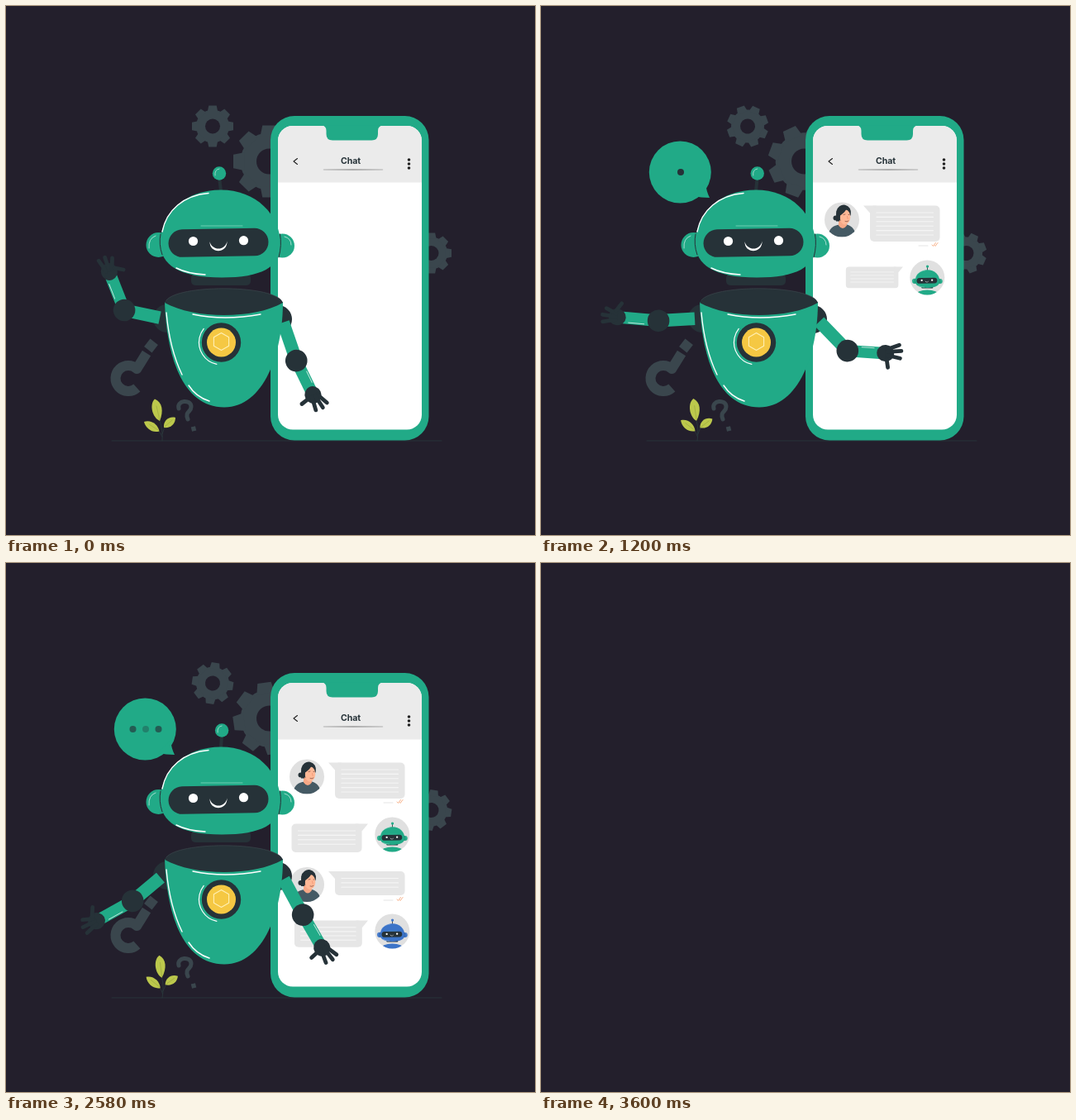
Recreate the animation shown at these times as an HTML page with a canvas. Size 640 by 640 pixels, loop 3.63 s.

```html
<!DOCTYPE html>
<html lang="en">
<head>
<meta charset="utf-8">
<title>Chat robot</title>
<style>
html, body { margin: 0; width: 100%; height: 100%; overflow: hidden; background: #231f2c; }
canvas { display: block; width: 640px; height: 640px; }
</style>
</head>
<body>
<canvas id="stage" width="640" height="640"></canvas>
<script>
const ctx = document.getElementById('stage').getContext('2d');
const LOOP = 3630, BLANK_AT = 3600, TAU = Math.PI * 2;
const BG = '#231f2c', TEAL = '#21aa87', DARK = '#263238', GREY = '#3a464d', LEAF = '#bcc84c';

const clamp = v => Math.max(0, Math.min(1, v));
const smooth = v => { v = clamp(v); return v * v * (3 - 2 * v); };
const mix = (a, b, p) => a + (b - a) * p;
const pop = (t, start, length = 250) => smooth((t - start) / length);
const rad = deg => deg * Math.PI / 180;

// Eased value through [time, value] pairs.
function track(t, keys) {
  for (let i = 1; i < keys.length; i++) {
    const [t0, a] = keys[i - 1], [t1, b] = keys[i];
    if (t <= t1) return mix(a, b, smooth((t - t0) / (t1 - t0)));
  }
  return keys[keys.length - 1][1];
}

function fill(color, path) {
  ctx.beginPath();
  path();
  ctx.fillStyle = color;
  ctx.fill();
}
function stroke(color, width, path, cap = 'round') {
  ctx.beginPath();
  path();
  ctx.strokeStyle = color;
  ctx.lineWidth = width;
  ctx.lineCap = cap;
  ctx.lineJoin = 'round';
  ctx.stroke();
}
const disc = (x, y, r, color) => fill(color, () => ctx.arc(x, y, r, 0, TAU));
const oval = (x, y, rx, ry, color, turn = 0) => fill(color, () => ctx.ellipse(x, y, rx, ry, turn, 0, TAU));
const box = (x, y, w, h, r, color) => fill(color, () => ctx.roundRect(x, y, w, h, r));
const line = (color, width, x0, y0, x1, y1, cap) =>
  stroke(color, width, () => { ctx.moveTo(x0, y0); ctx.lineTo(x1, y1); }, cap);
const curve = (color, width, d) => {
  ctx.strokeStyle = color;
  ctx.lineWidth = width;
  ctx.lineCap = 'round';
  ctx.stroke(new Path2D(d));
};
const shape = (color, d) => { ctx.fillStyle = color; ctx.fill(new Path2D(d)); };

function group(draw) {
  ctx.save();
  draw();
  ctx.restore();
}
function scaled(x, y, s, draw) {
  if (s <= 0) return;
  group(() => {
    ctx.translate(x, y);
    ctx.scale(s, s);
    ctx.translate(-x, -y);
    draw();
  });
}

function gear(x, y, r, hole, turn) {
  group(() => {
    ctx.translate(x, y);
    ctx.rotate(turn);
    fill(GREY, () => {
      ctx.arc(0, 0, r * 0.8, 0, TAU);
    });
    for (let i = 0; i < 8; i++) {
      fill(GREY, () => {
        ctx.moveTo(-r * 0.25, -r * 0.7);
        ctx.lineTo(-r * 0.19, -r);
        ctx.lineTo(r * 0.19, -r);
        ctx.lineTo(r * 0.25, -r * 0.7);
      });
      ctx.rotate(TAU / 8);
    }
    disc(0, 0, hole, BG);
  });
}

function questionMarks() {
  stroke(GREY, 12, () => {
    ctx.arc(148, 450.5, 15.5, rad(48), rad(312));
    ctx.lineTo(170, 420);
  }, 'butt');
  group(() => {
    ctx.translate(175.5, 411);
    ctx.rotate(rad(38));
    ctx.fillStyle = GREY;
    ctx.fillRect(-6, -6, 12, 12);
  });
  curve(GREY, 5, 'M209 487C206 477 224 475 224 485C224 492 216 490 220 500');
  group(() => {
    ctx.translate(227, 511.5);
    ctx.rotate(rad(-15));
    ctx.fillStyle = GREY;
    ctx.fillRect(-2.7, -2.7, 5.4, 5.4);
  });
}

function plant(t) {
  const sway = (1 - Math.cos(TAU * t / (LOOP / 2))) / 2;
  group(() => {
    ctx.translate(189, 526);
    ctx.rotate(rad(6.5 * sway));
    ctx.translate(-189, -526);
    curve('#2b3a3e', 0.8, 'M189 526Q190 512 186 502M189 521Q187 516 184 514M189 518L192 509');
    shape(LEAF, 'M186 502C177 498 173 482 180 475.5C189 479 191 490 186 502Z');
    shape(LEAF, 'M185.500 514.500C177 517 169 511 167 503C175 500 184 506 185.500 514.500Z');
    shape(LEAF, 'M191 510C190 502 197 496 205 498C205 506 199 511 191 510Z');
    curve('#8f9a3c', 0.5, 'M186 501L182 484M184 513L173 506M192 509L201 501');
  });
}

function speechBubble(t) {
  scaled(203, 232, pop(t, 60, 440), () => {
    disc(168.3, 201, 37.5, TEAL);
    shape(TEAL, 'M184 230Q194 232 204 232Q200 224 199 214Z');
    const outer = (1 - Math.cos(TAU * t / 600)) / 2;
    [[153.5, outer], [169, 1 - outer], [184.5, outer]].forEach(([x, alpha]) => {
      ctx.globalAlpha = alpha;
      disc(x, 201, 4, DARK);
    });
  });
}

function phone() {
  box(320, 133, 191.5, 392.5, 29, TEAL);
  box(329, 145, 174, 367.500, 18, '#fff');
  box(329, 145, 174, 68.500, [18, 18, 0, 0], '#ebebeb');
  shape(TEAL, 'M382 144.500Q387.500 145 387.500 151V155Q387.500 162.500 395 162.500H442.500Q450 162.500 450 155V151Q450 145 456 144.500Z');
  curve('#222', 1.1, 'M352.500 184.500L348 188L352.500 191.500');
  ctx.fillStyle = DARK;
  ctx.font = '700 10.5px Inter, "Open Sans", sans-serif';
  ctx.textAlign = 'center';
  ctx.fillText('Chat', 417, 191.3);
  const fade = ctx.createLinearGradient(384, 0, 456, 0);
  fade.addColorStop(0, '#c4c4c4');
  fade.addColorStop(0.5, '#999');
  fade.addColorStop(1, '#c4c4c4');
  line(fade, 1.5, 384.5, 198, 455.5, 198);
  [186, 191, 196].forEach(y => disc(487.5, y, 1.8, '#222'));
}

function person(x, y) {
  group(() => {
    ctx.translate(x, y);
    disc(0, 0, 21, '#e0e0e0');
    ctx.beginPath();
    ctx.arc(0, 0, 21, 0, TAU);
    ctx.clip();
    shape('#455a64', 'M-17 21C-16 10 -10 7 -3 6L6 6C13 8 16 12 17 21Z');
    shape('#f7a886', 'M-4 -2L-4 7Q1 14 6 7L5 0Z');
    disc(-7.5, -2, 3, DARK);
    oval(2, -8, 9, 10, DARK, 0.2);
    oval(4, -3, 6.3, 9, '#ffb896', 0.06);
    shape(DARK, 'M-7 2C-8 -12 -2 -19 7 -16C4 -9 2 -8 -2 -5L-3 2Z');
    curve('#7b4a3c', 0.7, 'M2 -6L4 -6.500M8 -6L9 -6M4 2Q6 3 8 1.500');
    line('#e98566', 0.6, 6.5, -4, 7.2, -1);
  });
}

function head(color, tip, spread) {
  line(DARK, 4, 260, 224, tip, 207);
  disc(tip, 202.5, 8.2, color);
  curve('#ffffffaa', 0.8, `M${tip - 5} 205Q${tip - 6} 198 ${tip} 197`);
  disc(184.500, 289, 15, color);
  disc(334.500, 290, 14.5, color);
  curve('#ffffffaa', 0.9, 'M173 293Q172 281 181 278M337 279Q345 281 345 289');
  shape(color, 'M187 287C187 249 218 222.500 260 222.500C302 222.500 332 252 332 289C332 316 309 328.500 261 328.500C209 328.500 187 313 187 287Z');
  curve(DARK, 1, 'M187 276Q184.500 288 189 301M331.500 276Q334 289 330 304');
  curve('#fff', 1.4, 'M189 273C194 247 215 229 245 226.500M206 317Q220 324 241 325');
  line('#6cceb2', 1, 236, 266, 286, 266);
  group(() => {
    ctx.translate(257, 286.3);
    ctx.rotate(rad(-1));
    box(-60.5, -16.800, 121, 33.600, 16.8, DARK);
  });
  disc(257 - 30.5 * spread, 284.5, 5.6, '#fff');
  disc(257 + 30.5 * spread, 283.7, 5.6, '#fff');
  shape('#fff', 'M246.500 285C246 300 268 300 267.500 284.500C265 297 249 296 246.500 285Z');
}

function botAvatar(x, y, color) {
  group(() => {
    ctx.translate(x, y);
    disc(0, 0, 21, '#e0e0e0');
    group(() => {
      ctx.beginPath();
      ctx.arc(0, 0, 21, 0, TAU);
      ctx.clip();
      oval(0, 21, 14, 6, color);
    });
    box(-7, 10, 14, 3, 1, DARK);
    ctx.scale(0.205, 0.205);
    ctx.translate(-259, -268);
    head(color, 260, 1);
  });
}

function message(t, start, x, y, w, h, tip) {
  scaled(tip, y, pop(t, start), () => {
    const grey = '#e6e6e6', left = tip < x;
    box(x, y, w, h, 5, grey);
    fill(grey, () => {
      ctx.moveTo(tip, y);
      ctx.lineTo(left ? x + 8 : x + w - 8, y);
      ctx.lineTo(left ? x : x + w, y + 9);
    });
    for (let row = y + 8.5; row < y + h - 6; row += 5.4) line('#f5f5f5', 1.1, x + 8, row, x + w - 8, row);
  });
}

function ticks(t, start, y) {
  group(() => {
    ctx.globalAlpha = pop(t, start, 120);
    line('#e4e4e4', 1, 457, y + 1, 468, y + 1);
    curve('#f5a06e', 0.8, `M473 ${y}l1.500 1.500l3 -4M476 ${y + 0.5}l1 1l3 -4`);
  });
}

function chat(t) {
  scaled(364, 258.5, pop(t, 100), () => person(364, 258.5));
  message(t, 310, 398, 241.5, 84.5, 43.5, 390);
  ticks(t, 720, 289);
  scaled(469, 357, pop(t, 860), () => botAvatar(467.3, 328.5, TEAL));
  message(t, 1033, 345.5, 315.5, 85, 34.5, 438);
  scaled(364, 389, pop(t, 1300), () => person(364, 389));
  message(t, 1495, 398, 373, 84.5, 29, 390);
  ticks(t, 1880, 407);
  const grow = pop(t, 2117);
  const blue = `rgb(${mix(33, 60, grow)}, ${mix(170, 116, grow)}, ${mix(135, 200, grow)})`;
  scaled(469.5, 474, grow, () => botAvatar(467.3, 445.5, blue));
  message(t, 2360, 345.5, 432.5, 85, 33.500, 438);
  message(t, 2610, 345.5, 479, 85, 20, 438);
}

// Angles are in degrees; side -1 mirrors the arm to the left.
function arm(x, y, side, upperLength, upper, lower, tips, palm) {
  group(() => {
    ctx.translate(x, y);
    ctx.scale(side, 1);
    disc(-5, 0, 17, DARK);
    ctx.rotate(rad(upper));
    line(TEAL, 15.5, 4, 0, upperLength, 0, 'butt');
    ctx.translate(upperLength, 0);
    ctx.rotate(rad(lower - upper));
    line(TEAL, 14.5, 0, 0, palm - 7, 0, 'butt');
    line('#ffffffbb', 0.9, 17, -5.5 * side, palm - 14, -5.5 * side);
    disc(0, 0, 13.3, DARK);
    oval(palm, 0, 10.5, 10, DARK);
    tips.forEach(([tx, ty]) => line(DARK, 4.8, palm + 2, ty * 0.45, tx - 2, ty));
  });
}

function leftArm(t) {
  const upper = track(t, [[540, -12], [1080, -2], [1620, 40], [2760, 40], [3560, -12]]);
  const lower = track(t, [[540, -68.6], [1140, -7], [1600, 32], [2480, 32], [3480, -68.6]]);
  arm(190, 378, -1, 48, upper, lower, [[69, 7], [70, -1.5], [66, -9.5], [48, -17]], 50);
}

function rightArm(t) {
  const upper = track(t, [[300, 71], [1060, 46], [2160, 46], [2880, 71]]);
  const lower = track(t, [[130, 64], [870, 3.7], [1960, 3.7], [2700, 64]]);
  arm(334, 379, 1, 53, upper, lower, [[64, -11], [67, -4], [66, 5], [52, 17]], 46);
}

function body() {
  box(224, 324, 72, 14, 5, DARK);
  shape(TEAL, 'M192 358C194 420 212 485.500 264 485.500C312 485.500 335 420 335 358Z');
  shape(DARK, 'M192 359C198 336 328 336 335 359C300 379 228 379 192 359Z');
  curve('#3f4b50', 0.6, 'M194 356C208 337 318 337 333 356');
  curve('#fff', 1.4, 'M194 371Q198 415 213 446M221 459Q230 473 246 478M226 373Q264 381 308 373');
  disc(260.5, 407, 23.7, DARK);
  disc(260.5, 407, 17.5, '#f5c843');
  stroke('#fff0b4', 1.1, () => {
    for (let i = 0; i < 6; i++) {
      const a = rad(60 * i - 90);
      ctx.lineTo(260.5 + 10.5 * Math.cos(a), 406 + 10.5 * Math.sin(a));
    }
    ctx.closePath();
  });
  stroke('#fff', 1.2, () => ctx.arc(260.5, 407, 27, rad(102), rad(218)));
}

function draw(t) {
  ctx.fillStyle = BG;
  ctx.fillRect(0, 0, 640, 640);
  if (t >= BLANK_AT) return;
  const turn = rad(74.6 * t / LOOP);
  line('#263238', 1, 128, 526, 527, 526);
  gear(250, 145.5, 25, 9, turn);
  gear(318.5, 188, 43.5, 15.5, -turn);
  gear(514.5, 299, 24.5, 9, turn);
  questionMarks();
  plant(t);
  speechBubble(t);
  phone();
  chat(t);
  leftArm(t);
  rightArm(t);
  body();
  const bump = (center, half) => Math.cos(clamp(Math.abs(t - center) / half) * Math.PI / 2) ** 2;
  const spread = 1 + 0.13 * (bump(600, 300) + bump(3060, 240));
  head(TEAL, 260.5 - 2.5 * Math.cos(TAU * t / LOOP), spread);
}

const begin = performance.now();
function tick() {
  draw((performance.now() - begin) % LOOP);
  requestAnimationFrame(tick);
}
tick();
</script>
</body>
</html>
```
